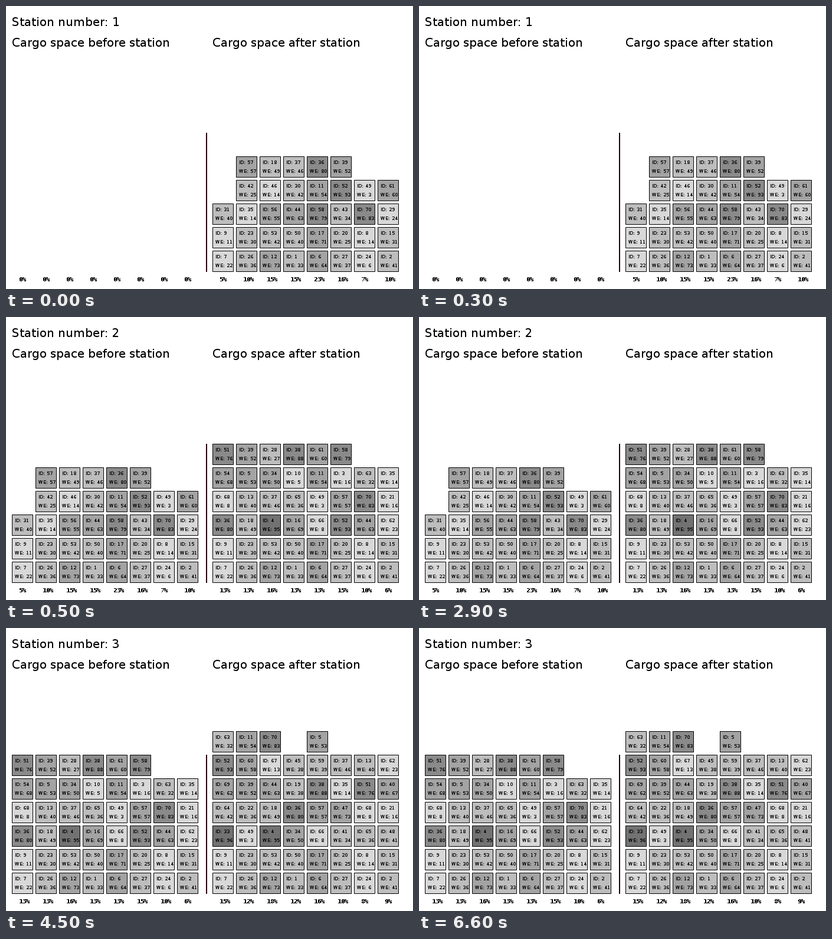
These frames come from a looping animation (690x480 px, 8000 ms). A matplotlib script:

```python
import random

import matplotlib.pyplot as plt
from matplotlib.animation import FuncAnimation
from matplotlib.patches import Rectangle

W, H, DPI = 690, 480, 96
STEP = 500               # ms per animation step
STARTS = (0, 500, 4500)  # ms at which each station appears
CELL, BOX, FLOOR = 40, 35, 415
LEFT, RIGHT = 10, 350

FIRST_ROW = (7, 26, 12, 1, 6, 27, 24, 2)
HEIGHTS = ((3, 5, 5, 5, 5, 5, 4, 4),
           (6, 6, 6, 6, 6, 6, 5, 5),
           (7, 7, 7, 6, 7, 6, 6, 6))
BOXES, KEEP, DROPPED = 70, 2, 7

SHADES = [(25, "#d8d8d8"), (50, "#bdbdbd"), (75, "#a3a3a3"),
          (95, "#8a8a8a"), (101, "#727272")]

plt.rcParams.update({"text.hinting": "default", "text.hinting_factor": 1,
                     "text.kerning_factor": 6})

rng = random.Random(4)
weights = {i: rng.randint(3, 97) for i in range(1, BOXES + 1)}


def restock(stacks, heights, waiting):
    """Keep the stack bottoms, drop a few upper boxes, refill with new ones."""
    kept = [stack[:KEEP] for stack in stacks]
    loose = [i for stack in stacks for i in stack[KEEP:]]
    rng.shuffle(loose)
    loose = loose[DROPPED:]
    need = sum(heights) - sum(map(len, kept))
    while len(loose) < need:
        loose.append(waiting.pop())
    rng.shuffle(loose)
    for stack, height in zip(kept, heights):
        while len(stack) < height:
            stack.append(loose.pop())
    return kept


def plan_cargo():
    waiting = [i for i in weights if i not in FIRST_ROW]
    rng.shuffle(waiting)
    plan, stacks = [[[] for _ in FIRST_ROW]], [[i] for i in FIRST_ROW]
    for heights in HEIGHTS:
        stacks = restock(stacks, heights, waiting)
        plan.append(stacks)
    return plan


fig = plt.figure(figsize=(W / DPI, H / DPI), dpi=DPI, facecolor="white")
ax = fig.add_axes([0, 0, 1, 1])
ax.set_xlim(0, W)
ax.set_ylim(H, 0)
ax.axis("off")


def label(x, y, text, px, **style):
    style = {"family": "DejaVu Sans", **style}
    return ax.text(x, y, text, fontsize=px * 72 / DPI, va="baseline", **style)


def shade(weight):
    return next(color for limit, color in SHADES if weight < limit)


def draw_box(x, y, box_id):
    weight = weights[box_id]
    # Half-pixel edges are already crisp; snapping would shift them
    rect = Rectangle((x + 0.5, y + 0.5), BOX, BOX, facecolor=shade(weight),
                     edgecolor="black", linewidth=72 / DPI, snap=False)
    return [ax.add_patch(rect),
            label(x + 5, y + 13, f"ID: {box_id}", 8),
            label(x + 5, y + 28, f"WE: {weight}", 8)]


def draw_cargo(x0, stacks):
    loads = [sum(weights[i] for i in stack) for stack in stacks]
    total = sum(loads) or 1
    parts = []
    for col, (stack, load) in enumerate(zip(stacks, loads)):
        x = x0 + CELL * col
        for row, box_id in enumerate(stack):
            parts += draw_box(x, FLOOR - CELL * row, box_id)
        parts.append(label(x + 12, 467, f"{load / total:.0%}", 10,
                           family="DejaVu Sans Mono", weight="bold",
                           antialiased=False))
    return parts


def draw_station(number, before, after):
    return ([label(LEFT, 34, f"Station number: {number}", 20)]
            + draw_cargo(LEFT, before) + draw_cargo(RIGHT, after))


label(LEFT, 69, "Cargo space before station", 20)
label(RIGHT, 69, "Cargo space after station", 20)
ax.add_patch(Rectangle((339, 215), 2, 236, facecolor="#24000b", linewidth=0))

cargo = plan_cargo()
stations = [draw_station(n, before, after)
            for n, (before, after) in enumerate(zip(cargo, cargo[1:]), 1)]


def update(frame):
    current = sum(frame * STEP >= start for start in STARTS) - 1
    for i, parts in enumerate(stations):
        for part in parts:
            part.set_visible(i == current)
    return []


anim = FuncAnimation(fig, update, frames=16, interval=STEP, repeat=True)
plt.show()
```
